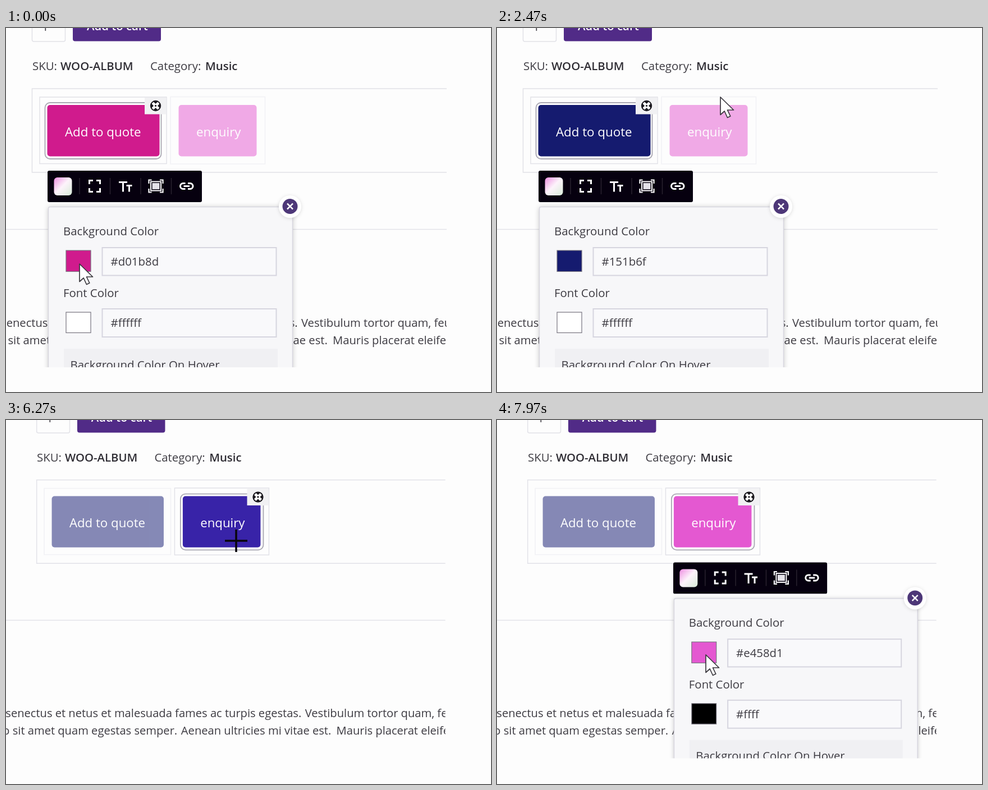
Write an HTML page that moves like this. It is 864 px wide and 648 px high and loops after 8 s.

```html
<!DOCTYPE html>
<html lang="en">
<head>
<meta charset="utf-8">
<title>Button styling</title>
<style>
  html, body { margin: 0; width: 100%; height: 100%; overflow: hidden; background: #fdfdfd; }
  svg { display: block; width: 100vw; height: 100vh; }
  text { font: 20.4px "Open Sans", "Noto Sans", sans-serif; fill: #3d3b42; white-space: pre; }
  .strong { font-weight: 600; fill: #2f2d34; }
  .copy { font-size: 20.2px; }
  .btn { font-size: 22.3px; fill: #fff; }
  .line { fill: none; stroke: #e2e2e8; stroke-width: 1.5; }
  .icon { fill: none; stroke: #fff; stroke-width: 3; }
  .field { fill: #f9f9fb; stroke: #d6d5df; stroke-width: 2; }
  .swatch { stroke: #77747f; stroke-width: 1.2; }
  .panel { fill: #f7f7f9; stroke: #d8d7e0; stroke-width: 1.5; filter: drop-shadow(0 1px 4px #0003); }
</style>
</head>
<body>
<svg viewBox="0 0 864 648">
  <defs>
    <clipPath id="view"><rect width="785" height="604"/></clipPath>
    <linearGradient id="tint" x2="1" y2="1">
      <stop offset="0" stop-color="#ee8fe2"/>
      <stop offset=".48" stop-color="#fdf3fb"/>
      <stop offset="1" stop-color="#d9ecd9"/>
    </linearGradient>
  </defs>
  <rect width="864" height="648" fill="#fdfdfd"/>

  <g id="zoom"><g clip-path="url(#view)"><g id="pan">
    <rect class="line" x="46.500" y="-30" width="59" height="54" rx="3"/>
    <text x="64" y="5">1</text>
    <rect x="119" y="-30" width="157" height="53.500" rx="4" fill="#512b87"/>
    <text class="strong" x="144" y="4" style="fill:#fff">Add to cart</text>
    <text x="47" y="75">SKU:</text>
    <text class="strong" x="97" y="75">WOO-ALBUM</text>
    <text x="257" y="75">Category:</text>
    <text class="strong" x="355" y="75">Music</text>

    <rect class="line" x="46.500" y="108" width="800" height="149"/>
    <path class="line" d="M-20 358.500H800" stroke-width="2"/>
    <text class="copy" x="-9" y="532">senectus et netus et malesuada fames ac turpis egestas.</text>
    <text class="copy" x="526" y="532">Vestibulum tortor quam, feugiat</text>
    <text class="copy" x="-14" y="563">o sit amet quam egestas semper.</text>
    <text class="copy" x="304.500" y="563">Aenean ultricies mi vitae est.</text>
    <text class="copy" x="582" y="563">Mauris placerat eleifend</text>

    <g id="quote">
      <rect class="line frame" x="60" y="123" width="226" height="118.500"/>
      <rect class="ring" x="69.500" y="133" width="207" height="100" rx="9" fill="#fff" stroke="#a9a7b2" stroke-width="1.8"/>
      <g class="body">
        <rect class="fill" x="73.500" y="137" width="200" height="91.500" rx="5"/>
        <text class="btn" x="105" y="193">Add to quote</text>
      </g>
    </g>
    <g id="enquiry">
      <rect class="line frame" x="293" y="122.500" width="168.500" height="119.500"/>
      <rect class="ring" x="303.500" y="133" width="148" height="100" rx="9" fill="#fff" stroke="#a9a7b2" stroke-width="1.8"/>
      <g class="body">
        <rect class="fill" x="307.500" y="137" width="139" height="91.500" rx="5"/>
        <text class="btn" x="339" y="193">enquiry</text>
      </g>
    </g>
    <g id="handle">
      <rect x="247" y="124" width="38.500" height="29.500" fill="#f1f1f3"/>
      <g transform="translate(266.500 138.500)">
        <circle r="8.700" fill="#fff" stroke="#19171d" stroke-width="2"/>
        <path d="M0-3.500L-4.500-8H4.500ZM0 3.500L-4.500 8H4.500ZM-3.500 0L-8-4.500V4.500ZM3.500 0L8-4.500V4.500ZM0-2L2 0L0 2L-2 0Z" fill="#19171d"/>
      </g>
    </g>

    <g id="tools">
      <rect x="74" y="254" width="275" height="56" rx="3" fill="#06000f"/>
      <rect x="85.500" y="266" width="32" height="32" rx="6" fill="url(#tint)"/>
      <path d="M131 267v29M185.500 267v29M240 267v29M294.500 267v29" stroke="#29222f" stroke-width="1.5"/>
      <path class="icon" d="M148.500 278v-6.500h6.500M161 271.500h6.500v6.500M167.500 285v6.500h-6.500M155 291.500h-6.500v-6.500"/>
      <path class="icon" d="M201 274.500h15M208.500 274.500v17M214.500 280.500h10M219.500 280.500v11"/>
      <path class="icon" style="stroke-width:2.200" d="M254.500 277v-6.500h5M274 270.500h5.500v6.500M279.500 286v6.500h-5.500M259.500 292.500h-5v-6.500"/>
      <rect class="icon" style="stroke-width:2" x="258" y="273.500" width="18" height="16"/>
      <rect x="260.500" y="276" width="13" height="11" fill="#e4e2e8"/>
      <path class="icon" d="M319.500 276.500h-4a5 5 0 0 0 0 10h4M324 276.500h4a5 5 0 0 1 0 10h-4M316.500 281.500h10.500"/>
    </g>

    <g id="panel">
      <rect class="panel" x="75.500" y="318.500" width="435" height="330" rx="3"/>
      <text x="102" y="369">Background Color</text>
      <rect id="bgSwatch" class="swatch" x="107" y="396" width="44" height="37.500"/>
      <rect class="field" x="171.500" y="391" width="310" height="49.500"/>
      <text id="bgHex" x="186.500" y="423"></text>
      <text x="102" y="479">Font Color</text>
      <rect id="fontSwatch" class="swatch" x="107" y="506" width="44" height="36.500"/>
      <rect class="field" x="171.500" y="500" width="310" height="50"/>
      <text id="fontHex" x="186.500" y="532"></text>
      <rect x="103" y="571" width="381" height="60" fill="#f0f0f3"/>
      <text x="114.500" y="607">Background Color On Hover</text>
      <circle cx="506" cy="318" r="20" fill="#fff" style="filter:drop-shadow(0 1px 3px #0002)"/>
      <circle cx="506" cy="317.500" r="13.500" fill="#4d3778"/>
      <path class="icon" style="stroke-width:2.500" d="M501 312.500l10 10M511 312.500l-10 10"/>
    </g>
  </g></g></g>

  <g id="cursor" stroke-linejoin="round">
    <path id="arrow" d="M0 0V31.500L7.200 25L12.500 36.500L17.800 34L12.500 23H23.500Z" fill="#fff" stroke="#3a383e" stroke-width="1.700"/>
    <g id="hand" fill="#fff" stroke="#222" stroke-width="1.700">
      <path d="M-3-7Q-3-10 0-10T3-7V4Q7 1 8.500 5Q12 2.500 13.500 7Q18 5 18.500 11V19Q18 26 14 32H0Q-3 25-8 20Q-13 14-11 12Q-8 10-3 15Z"/>
      <path d="M3 3V12M8.500 5V13M13.500 7V14" fill="none"/>
    </g>
    <path id="cross" d="M-20 0H20M0-20V20" stroke="#08060b" stroke-width="3.500"/>
  </g>
</svg>

<script>
const LOOP = 8000, CUT = 4970, PICK = 5770, TOOLS = 6400, OPEN = 7420;
const $ = id => document.getElementById(id);
const set = (el, attrs) => { for (const k in attrs) el.setAttribute(k, attrs[k]); };
const show = (el, on) => set(el, { visibility: on ? 'visible' : 'hidden' });

const track = [
  [0, 131, 420], [30, 131, 420], [520, 368, 262], [600, 368, 262],
  [1150, 310, 262], [1270, 310, 262], [1670, 424, 96], [1700, 424, 96],
  [2470, 398, 123], [2530, 398, 123], [3100, 414.5, 122.16], [3300, 414.5, 122.16],
  [3870, 576, 51], [4230, 576, 51], [4530, 506, 314], [4670, 506, 314],
  [4800, 504, 316], [4970, 504, 316], [5570, 400, 190], [5770, 400, 190],
  [6130, 410, 215], [6420, 410, 215], [7070, 343, 285], [7450, 343, 285],
  [7900, 372, 418], [8000, 372, 418]
];

function pointer(t) {
  const i = track.findIndex(k => k[0] > t);
  const [t0, x0, y0] = track[i - 1], [t1, x1, y1] = track[i];
  const p = (t - t0) / (t1 - t0), e = p * p * (3 - 2 * p);
  return [x0 + (x1 - x0) * e, y0 + (y1 - y0) * e];
}

function hsvHex(h, s, v) {
  const part = n => {
    const k = (n + h / 60) % 6;
    const c = v - v * s * Math.max(0, Math.min(k, 4 - k, 1));
    return Math.round(c * 255).toString(16).padStart(2, '0');
  };
  return '#' + part(5) + part(3) + part(1);
}

// The hidden picker: a hue slider first, then the saturation/value square.
function quoteColor(t) {
  if (t < 1700) {
    const x = t < 600 ? 368 : pointer(Math.min(t, 1200))[0];
    return hsvHex(238 + (x - 310) / 58 * 84.2, 0.87, 0.8157);
  }
  const [x, y] = pointer(Math.min(t, 3200));
  return hsvHex(235.7, 0.811 + (x - 398) / 300, 0.435 - (y - 123) / 200);
}

function styleButton(id, color, active) {
  const part = c => $(id).querySelector(c);
  set(part('.fill'), { fill: color });
  set(part('.body'), { opacity: active ? 1 : 0.5 });
  set(part('.frame'), { opacity: active ? 1 : 0.4 });
  show(part('.ring'), active);
}

function draw(t) {
  const [x, y] = pointer(t);
  const second = t >= CUT, picked = t >= PICK;
  const over = second && x > 315 && x < 454 && y > 135 && y < 228;
  const quote = quoteColor(t);

  set($('zoom'), { transform: second ? 'scale(.997)' : '' });
  set($('pan'), { transform: second ? 'translate(8.300 -1)' : '' });

  styleButton('quote', quote, !picked);
  styleButton('enquiry', over ? '#3823a8' : '#e458d1', picked);
  show($('handle'), t < 3330 || picked);
  set($('handle'), { transform: `translate(${picked ? 175.5 : 0} 0)` });

  show($('tools'), !second || t >= TOOLS);
  show($('panel'), !second || t >= OPEN);
  for (const id of ['tools', 'panel']) {
    set($(id), { transform: picked ? 'translate(232.600 1.300)' : '' });
  }

  const bg = picked ? '#e458d1' : quote;
  set($('bgSwatch'), { fill: bg });
  $('bgHex').textContent = bg;
  set($('fontSwatch'), { fill: picked ? '#000' : '#fff' });
  $('fontHex').textContent = picked ? '#ffff' : '#ffffff';

  const onClose = t > 4230 && !second && Math.hypot(x - 506, y - 317) < 14;
  const onTools = t >= TOOLS && y > 254 && y < 310;
  const kind = over ? 'cross' : onClose || onTools ? 'hand' : 'arrow';
  for (const id of ['arrow', 'hand', 'cross']) show($(id), id === kind);
  set($('cursor'), { transform: `translate(${x} ${y})` });
}

const start = performance.now();
function tick() {
  draw((performance.now() - start) % LOOP);
  requestAnimationFrame(tick);
}
tick();
</script>
</body>
</html>
```
